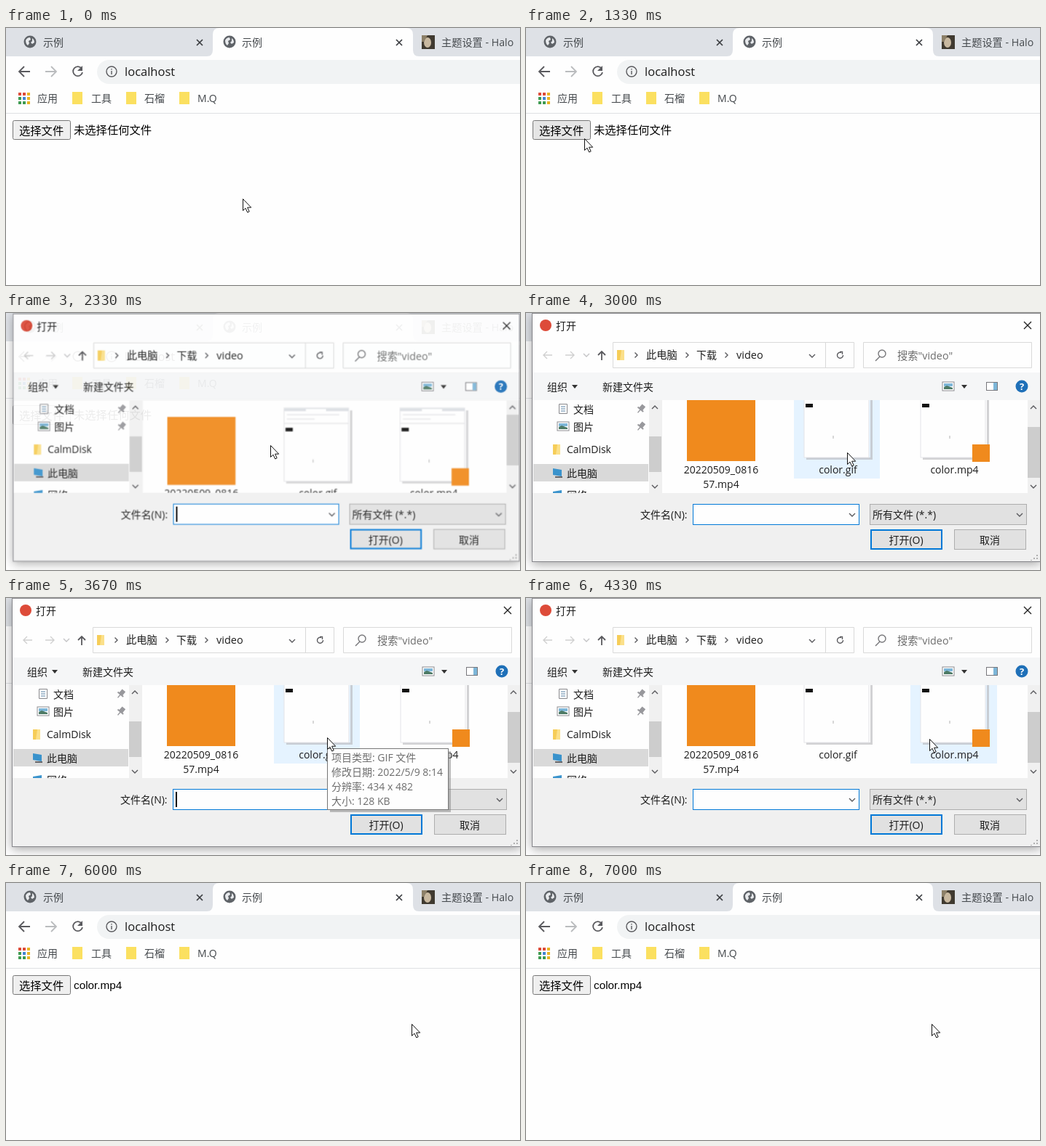
Write an HTML page that moves like this. It is 706 px wide and 354 px high and loops after 7.33 s.

```html
<!DOCTYPE html>
<html lang="zh-CN">
<head>
<meta charset="utf-8">
<title>选择文件</title>
<style>
  html, body { margin: 0; width: 100%; height: 100%; overflow: hidden; background: #fefefe; }
  svg { display: block; width: 706px; height: 354px; }
  text { font: 14px "Open Sans", "Noto Sans CJK SC", "Noto Sans CJK", sans-serif; fill: #1c1c1c; white-space: pre; }
  .form { font: 15.3px "Liberation Sans", "Noto Sans CJK SC", "Noto Sans CJK", sans-serif; fill: #000; }
  .url { font-size: 16.5px; }
  .tab, .mark { fill: #45494d; }
  .dim { fill: #6d6d6d; }
  .mid { text-anchor: middle; }
  .line { fill: none; stroke: #5a5a5e; stroke-width: 1.4; }
  .bold { stroke-width: 1.8; }
  .pale { stroke: #d0d0d0; }
  .gray { stroke: #77777a; }

  #cursor, #dialog, #files, #thumb, #caret, #tip, #overGif, #overMp4, #empty, #chosen, #button {
    animation: 7330ms step-end infinite;
  }
  #cursor { animation-name: cursor; }
  #dialog { animation-name: dialog; transform-origin: 355px 171px; }
  #files { animation-name: files; }
  #thumb { animation-name: thumb; }
  #caret { animation-name: caret; }
  #tip { animation-name: tip; }
  #overGif { animation-name: overGif; }
  #overMp4 { animation-name: overMp4; }
  #empty { animation-name: empty; }
  #chosen { animation-name: chosen; }
  #button { animation-name: button; }
  #frame { filter: drop-shadow(0 3px 7px rgb(0 0 0 / .35)); }

  @keyframes cursor {
    0% { transform: translate(325px, 235px); }
    13.64% { transform: translate(177px, 185px); }
    18.14% { transform: translate(80px, 152px); }
    22.78% { transform: translate(70px, 145px); }
    27.28% { transform: translate(174px, 162px); }
    31.78% { transform: translate(363px, 182px); }
    36.42% { transform: translate(396px, 188px); }
    40.92% { transform: translate(441px, 192px); }
    54.56% { transform: translate(554px, 194px); }
    77.35%, 100% { transform: translate(557px, 194px); }
  }
  @keyframes dialog {
    0% { opacity: 0; }
    31.78% { opacity: .93; transform: scale(.996); }
    36.42% { opacity: 1; transform: none; }
    77.35% { opacity: .4; transform: scale(.96); }
    81.85%, 100% { opacity: 0; }
  }
  @keyframes files {
    0% { transform: translate(0, 33px); }
    40.92%, 100% { transform: none; }
  }
  @keyframes thumb {
    0% { transform: translate(0, -17px); }
    40.92%, 100% { transform: none; }
  }
  @keyframes caret {
    0% { opacity: 1; }
    40.92% { opacity: 0; }
    50.06% { opacity: 1; }
    59.07% { opacity: 0; }
    68.21%, 100% { opacity: 1; }
  }
  @keyframes tip {
    0% { opacity: 0; }
    50.06% { opacity: 1; }
    54.56%, 100% { opacity: 0; }
  }
  @keyframes overGif {
    0% { opacity: 0; }
    36.42% { opacity: 1; }
    54.56%, 100% { opacity: 0; }
  }
  @keyframes overMp4 {
    0% { opacity: 0; }
    54.56%, 100% { opacity: 1; }
  }
  @keyframes empty {
    0% { opacity: 1; }
    77.35%, 100% { opacity: 0; }
  }
  @keyframes chosen {
    0% { opacity: 0; }
    77.35%, 100% { opacity: 1; }
  }
  @keyframes button {
    0% { fill: #efefef; }
    18.14% { fill: #e5e5e5; }
    27.28%, 100% { fill: #efefef; }
  }
</style>
</head>
<body>
<svg viewBox="0 0 706 354">
  <defs>
    <g id="globe">
      <circle r="8.5" fill="#5f6368"/>
      <path d="M-6-2Q-4-6 0-6L1-3-2-1-1 2-3 5Q-6 3-6-2ZM3-5Q6-3 6 1L3 3 1 1 3-1Z" fill="#e8eaed"/>
    </g>
    <path id="close" d="M-4-4 4 4M4-4-4 4" fill="none" stroke="#3a3c40" stroke-width="1.7"/>
    <path id="folder" d="M-7-8H7V9H-7Z" fill="#fbe060"/>
    <path id="right" d="M-1.500-3.500 2 0-1.500 3.500" class="line"/>
    <path id="down" d="M-4-2 0 2 4-2" class="line"/>
    <path id="up" d="M-4 2 0-2 4 2" class="line"/>
    <path id="drop" d="M-4-2H4L0 3Z" fill="#333"/>
    <path id="pin" transform="rotate(40)" d="M-3-6H3V0H5V2H-5V0H-3ZM-.7 2H.7V7H-.7Z" fill="#98989c"/>
    <g id="picture">
      <rect x="-8" y="-6" width="16" height="12" fill="#fff" stroke="#8c8c90"/>
      <path d="M-6-4H6V0H-6Z" fill="#7db6d8"/>
      <path d="M-6 4V1L-2-1 6 2V4Z" fill="#4d7a65"/>
    </g>
    <g id="page">
      <path d="M3 101H91V3H94V104H3Z" fill="#b4b4b8" opacity=".6"/>
      <rect width="89" height="101" fill="#fefefe" stroke="#e4e4e8"/>
      <path d="M0 0H89V4H0Z" fill="#dcdfe4"/>
      <path d="M30 1H58V4H30Z" fill="#fff"/>
      <path d="M4 9H76M4 15H42M0 21H89" stroke="#dcdce0" fill="none"/>
      <rect x="2" y="27" width="10" height="5" fill="#111"/>
      <path d="M40 71V75" stroke="#b0b0b0"/>
    </g>
    <clipPath id="pane"><path d="M9 120H706V248H9Z"/></clipPath>
  </defs>

  <!-- browser window -->
  <rect width="706" height="354" fill="#fefefe"/>
  <rect width="706" height="39" fill="#dee1e6"/>
  <path d="M276 39Q284 39 284 30V9Q284 0 293 0H550Q559 0 559 9V30Q559 39 567 39Z" fill="#fefefe"/>
  <use href="#globe" x="33" y="19"/>
  <text class="tab" x="51" y="25">示例</text>
  <use href="#close" x="266" y="20"/>
  <use href="#globe" x="307" y="19"/>
  <text class="tab" x="324" y="25">示例</text>
  <use href="#close" x="540" y="20"/>
  <rect x="571" y="10" width="18" height="19" fill="#403a30"/>
  <ellipse cx="579" cy="20" rx="5" ry="7" fill="#c9b9a0"/>
  <path d="M571 10H579L574 19H571Z" fill="#8d8068"/>
  <text class="tab" x="598" y="25" style="font-size:14.2px">主题设置 - Halo</text>

  <path class="line bold" d="M33 60H18M25 53 18 60 25 67"/>
  <path class="line bold" d="M54 60H69M62 53 69 60 62 67" style="stroke:#babcbe"/>
  <path class="line bold" d="M104 56A6.5 6.5 0 1 0 105 61"/>
  <path d="M105 52V59H98Z" fill="#5a5a5e"/>
  <rect x="125" y="44" width="620" height="33" rx="16.5" fill="#f1f3f4"/>
  <circle cx="145" cy="60" r="7" class="line"/>
  <path d="M145 59V64M145 56V57.6" class="line"/>
  <text class="url" x="163" y="66">localhost</text>

  <g id="apps"></g>
  <text class="mark" x="43" y="102">应用</text>
  <use href="#folder" x="98" y="96"/><text class="mark" x="117" y="102">工具</text>
  <use href="#folder" x="172" y="96"/><text class="mark" x="190" y="102">石榴</text>
  <use href="#folder" x="245" y="96"/><text class="mark" x="263" y="102">M.Q</text>
  <path d="M0 117.5H706" stroke="#dfe1e4"/>

  <rect id="button" x="9.5" y="127.5" width="79" height="26" rx="2" stroke="#767676"/>
  <text class="form" x="18" y="147">选择文件</text>
  <text class="form" id="empty" x="93" y="146">未选择任何文件</text>
  <text class="form" id="chosen" x="93" y="146">color.mp4</text>

  <!-- file dialog -->
  <g id="dialog">
    <rect id="frame" x="8.5" y=".5" width="698" height="342" fill="#f0f0f0" stroke="#85858a"/>
    <path d="M9 1H706V82H9Z" fill="#fefefe"/>
    <path d="M9 82H706V120H9Z" fill="#f5f6f7"/>
    <circle cx="27" cy="17" r="8" fill="#dd4b39"/>
    <text x="41" y="23">打开</text>
    <path d="M684 12 694 22M694 12 684 22" class="line" style="stroke:#222"/>

    <path class="line pale" d="M36 58H24M29 53 24 58 29 63M54 58H66M61 53 66 58 61 63"/>
    <use href="#down" x="83" y="58" opacity=".35"/>
    <path class="line bold" d="M104 65V53M99 58 104 53 109 58"/>
    <path d="M119.5 40.5H450.5V75.5H119.5ZM411.5 40.5V75.5M463.5 40.5H694.5V75.5H463.5Z" fill="none" stroke="#d9d9d9"/>
    <path d="M125 51H131L133 53V65H125Z" fill="#f6cd58"/>
    <path d="M131 51H135V65H129Z" fill="#fbe08a"/>
    <use href="#right" x="151" y="58"/><text x="165" y="63" style="font-size:14.3px">此电脑</text>
    <use href="#right" x="221" y="58"/><text x="234" y="63">下载</text>
    <use href="#right" x="275" y="58"/><text x="289" y="63" style="font-size:14.5px">video</text>
    <use href="#down" x="393" y="59"/>
    <path class="line" d="M433 54.500A4 4 0 1 0 435.500 58M431 53.500H434.500V57"/>
    <path class="line gray" d="M480 66 486 60"/>
    <circle cx="489" cy="56" r="5" class="line gray"/>
    <text class="dim" x="510" y="64" style="font-size:14.3px">搜索"video"</text>

    <text x="29" y="107">组织</text><use href="#drop" x="67" y="101"/>
    <text x="105" y="107">新建文件夹</text>
    <use href="#picture" x="580" y="101"/><use href="#drop" x="602" y="101"/>
    <rect x="632.5" y="95.5" width="15" height="11" fill="#fff" stroke="#77777c"/>
    <path d="M642 96H647V106H642Z" fill="#7db6d8"/>
    <circle cx="681" cy="101" r="8.5" fill="#1f70b8"/>
    <text class="mid" x="681" y="106" style="fill:#fff;font-weight:700;font-size:13px">?</text>

    <g clip-path="url(#pane)">
      <path d="M9 120H706V248H9Z" fill="#fefefe"/>
      <path d="M10 208H168V232H10Z" fill="#d9d9d9"/>
      <path d="M45.500 125.500H56.500V138.500H45.500Z" fill="#fff" stroke="#88888c"/>
      <path d="M48 129H54M48 132H54M48 135H54" stroke="#5c86a8"/>
      <text x="65" y="138">文档</text><use href="#pin" x="158" y="132"/>
      <use href="#picture" x="51" y="156"/>
      <text x="65" y="162">图片</text><use href="#pin" x="158" y="156"/>
      <path d="M37 181H43L45 183V195H37Z" fill="#f6cd58"/><path d="M43 181H47V195H41Z" fill="#fbe08a"/>
      <text x="56" y="193">CalmDisk</text>
      <path d="M37 214 49 216V225L37 223Z" fill="#3a93cc"/><path d="M40 225H50V227H40Z" fill="#66666a"/>
      <text x="56" y="226">此电脑</text>
      <path d="M37 246 49 244V256H37Z" fill="#3a93cc"/>
      <text x="56" y="256">网络</text>

      <path d="M169 120H187V248H169ZM689 120H706V248H689Z" fill="#f0f0f0"/>
      <path d="M169 170H186V219H169Z" fill="#cdcdcd"/>
      <use href="#up" x="177" y="130"/><use href="#down" x="177" y="239"/>
      <rect id="thumb" x="689" y="157" width="17" height="70" fill="#cdcdcd"/>
      <use href="#up" x="697" y="130"/><use href="#down" x="697" y="239"/>

      <g id="files">
        <rect id="overGif" x="368" y="88" width="118" height="140" fill="#e5f3ff"/>
        <rect id="overMp4" x="528" y="88" width="119" height="140" fill="#e5f3ff"/>
        <rect x="221" y="110" width="94" height="94" fill="#f08a1d"/>
        <use href="#page" x="382" y="98"/>
        <use href="#page" x="542" y="98"/>
        <rect x="613" y="181" width="24" height="24" fill="#f08a1d"/>
        <text class="mid" x="268" y="221">20220509_0816</text>
        <text class="mid" x="268" y="241">57.mp4</text>
        <text class="mid" x="428.5" y="221">color.gif</text>
        <text class="mid" x="588.5" y="221">color.mp4</text>
      </g>
    </g>

    <text x="157" y="283">文件名(N):</text>
    <rect x="229.5" y="263.5" width="228" height="28" fill="#fefefe" stroke="#0078d7"/>
    <use href="#down" x="448" y="278"/>
    <path id="caret" d="M233 267H235V288H233Z"/>
    <rect x="472.5" y="263.5" width="215" height="28" fill="#e1e1e1" stroke="#adadad"/>
    <text x="476" y="283">所有文件 (*.*)</text>
    <use href="#down" x="678" y="278"/>
    <rect x="474" y="299" width="97" height="26" fill="#e1e1e1" stroke="#0078d7" stroke-width="2"/>
    <text class="mid" x="522" y="318">打开(O)</text>
    <rect x="588.5" y="298.5" width="98" height="27" fill="#e1e1e1" stroke="#adadad"/>
    <text class="mid" x="637" y="318">取消</text>
    <path d="M702 333V341M698 337V341M694 340V341" stroke="#b0b0b0" stroke-width="2" stroke-dasharray="2"/>

    <g id="tip">
      <path d="M445 211H611V295H445Z" fill="#808080" opacity=".5"/>
      <rect x="441.5" y="207.5" width="166" height="84" fill="#fefefe" stroke="#767676"/>
      <text class="dim" x="447" y="225">项目类型: GIF 文件</text>
      <text class="dim" x="447" y="245">修改日期: 2022/5/9 8:14</text>
      <text class="dim" x="447" y="265">分辨率: 434 x 482</text>
      <text class="dim" x="447" y="285">大小: 128 KB</text>
    </g>
  </g>

  <path id="cursor" d="M.5.500V16.500L4 13.200 6.700 19 9.200 17.900 6.600 12.200H11.700Z" fill="#fff" stroke="#111"/>
</svg>
<script>
  const colors = ["#dd4b39", "#dd4b39", "#e8b422", "#3d9a50", "#4285d4", "#e8b422", "#3d9a50", "#3d9a50", "#e8b422"];
  document.getElementById("apps").innerHTML = colors.map((color, i) =>
    `<rect x="${17 + i % 3 * 6}" y="${89 + Math.floor(i / 3) * 6}" width="4" height="4" fill="${color}"/>`
  ).join("");
</script>
</body>
</html>
```
